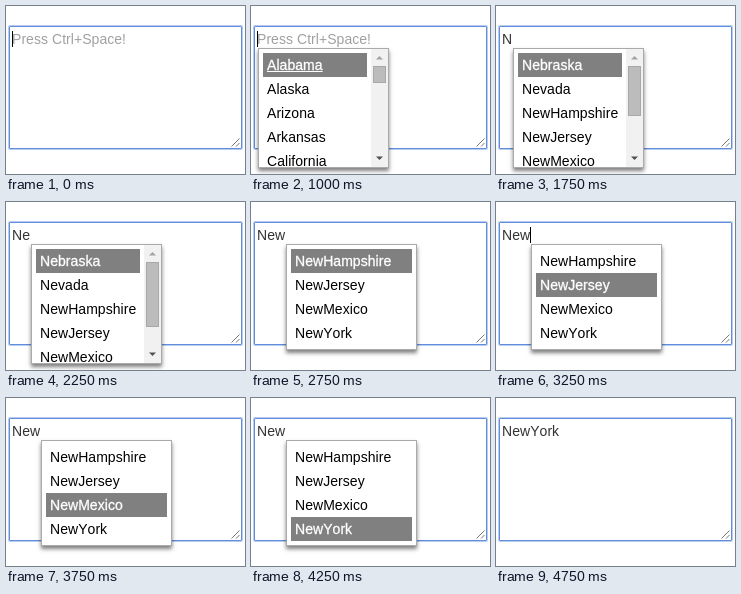
Animation of 239x168 px, one loop 5250 ms. Source, as an HTML page:

```html
<!DOCTYPE html>
<html lang="en">
<head>
<meta charset="utf-8">
<title>Autocomplete</title>
<style>
  html, body { margin: 0; width: 100%; height: 100%; overflow: hidden; background: #fff; }
  body { font: 14px/20px "Liberation Sans", Arial, sans-serif; font-kerning: none; letter-spacing: .05px; }
  #stage { position: relative; width: 239px; height: 168px; overflow: hidden; }
  #stage * { box-sizing: border-box; }
  #field {
    position: absolute; left: 3px; top: 20px; width: 233px; height: 123px;
    padding: 2px; border: 1px solid #608edb; border-radius: 1px;
    box-shadow: 0 0 0 1px rgba(96, 142, 219, .45); color: #333; white-space: pre;
  }
  #field.empty { color: #a0a0a0; }
  #caret { position: absolute; left: 6px; top: 25px; width: 1px; height: 16px; background: #000; }
  #grip { position: absolute; left: 225px; top: 132px; }
  #popup {
    position: absolute; top: 42px; width: 131px; max-height: 120px; padding: 4px;
    overflow: hidden; background: #fff; border: 1px solid #aaa;
    box-shadow: 0 3px 4px rgba(0, 0, 0, .5); color: #000;
  }
  #popup.long { padding-right: 21px; }
  .row { height: 24px; padding-left: 4px; line-height: 24px; white-space: nowrap; }
  .row.on { background: #808080; color: #fff; -webkit-text-stroke: .3px #fff; }
  .hover .on { text-decoration: underline; }
  #bar { position: absolute; right: 0; top: 0; width: 17px; height: 118px; background: #f1f1f1; }
  #thumb { position: absolute; left: 2px; top: 17px; width: 13px; background: #bcbcbc; border: 1px solid #a8a8a8; }
  #bar svg { position: absolute; left: 0; top: 0; }
</style>
</head>
<body>
<div id="stage">
  <div id="field"></div>
  <div id="caret"></div>
  <svg id="grip" width="10" height="10" stroke="#777" fill="none">
    <path d="M0.5 8.5L8.5 0.5M5 8.5L8.5 5"/>
  </svg>
  <div id="popup">
    <div id="rows"></div>
    <div id="bar">
      <div id="thumb"></div>
      <svg width="17" height="118">
        <path d="M5 10.5L8.5 7L12 10.5Z" fill="#a3a3a3"/>
        <path d="M5 107.5L8.5 111L12 107.5Z" fill="#505050"/>
      </svg>
    </div>
  </div>
</div>
<script>
const $ = id => document.getElementById(id);
const LOOP = 5250, ROW = 24, VIEW = 118, TRACK = 84;

const first = ["Alabama", "Alaska", "Arizona", "Arkansas", "California"];
const news = ["NewHampshire", "NewJersey", "NewMexico", "NewYork"];
const ne = ["Nebraska", "Nevada", ...news];
const all = [...ne, "NorthCarolina", "NorthDakota"];

// total: number of matches, which sets the scrollbar thumb
const steps = [
  { at: 0, text: "", caret: true },
  { at: 1000, text: "", caret: true, list: first, total: 50, sel: 0, x: 7, hover: true },
  { at: 1750, text: "N", list: all, sel: 0, x: 17 },
  { at: 2250, text: "Ne", list: ne, sel: 0, x: 25 },
  { at: 2750, text: "New", list: news, sel: 0, x: 35 },
  { at: 3250, text: "New", list: news, sel: 1, x: 35, caret: true, caretX: 34 },
  { at: 3750, text: "New", list: news, sel: 2, x: 35 },
  { at: 4250, text: "New", list: news, sel: 3, x: 35 },
  { at: 4750, text: "NewYork" }
];

function drawPopup({ list, total, sel, x, hover }) {
  const popup = $("popup");
  popup.style.display = list ? "block" : "none";
  if (!list) return;
  const height = (total || list.length) * ROW + 8;
  const long = height > VIEW;
  popup.style.left = x + "px";
  popup.className = (long ? "long " : "") + (hover ? "hover" : "");
  $("rows").replaceChildren(...list.map((name, i) => {
    const row = document.createElement("div");
    row.className = i === sel ? "row on" : "row";
    row.textContent = name;
    return row;
  }));
  $("bar").style.display = long ? "block" : "none";
  $("thumb").style.height = Math.max(17, Math.round(TRACK * VIEW / height)) + "px";
}

function draw(step) {
  $("field").textContent = step.text || "Press Ctrl+Space!";
  $("field").className = step.text ? "" : "empty";
  $("caret").style.display = step.caret ? "block" : "none";
  $("caret").style.left = (step.caretX || 6) + "px";
  drawPopup(step);
}

let shown = null;
const start = performance.now();
function tick(now) {
  const t = Math.max(0, now - start) % LOOP;
  const step = steps.findLast(s => s.at <= t);
  if (step !== shown) draw(shown = step);
  requestAnimationFrame(tick);
}
tick(start);
</script>
</body>
</html>
```
